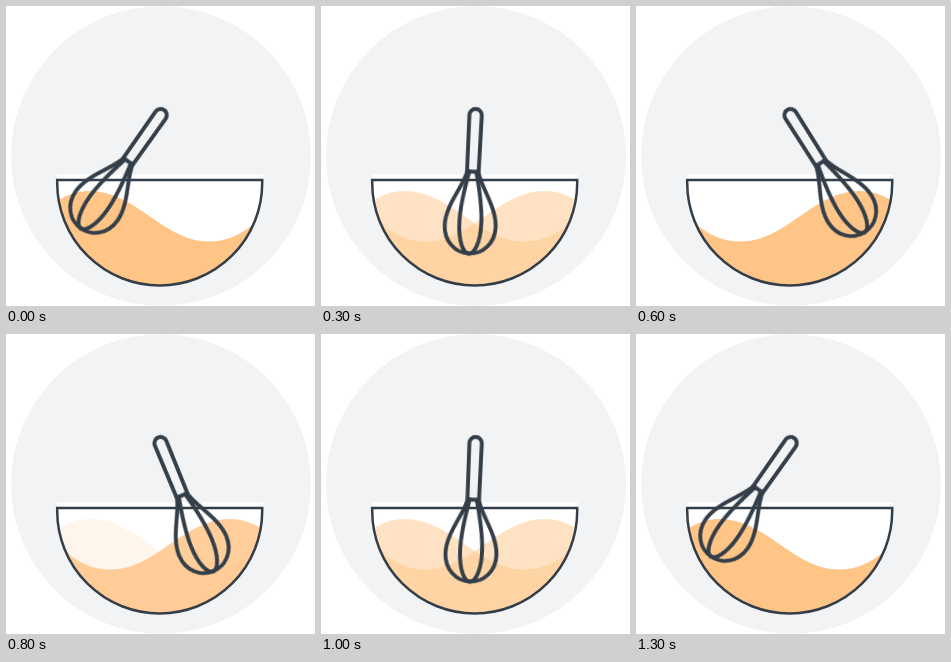
An HTML page that plays this animation: 309 by 300 pixels, repeating every 1400 ms.

```html
<!DOCTYPE html>
<html lang="en">
<head>
<meta charset="utf-8">
<title>Whisking bowl</title>
<style>
  html, body { margin: 0; width: 100%; height: 100%; overflow: hidden; background: #fff; }
  svg { display: block; width: 100vw; height: 100vh; }

  .batter { fill: #ffc587; animation: fade 1400ms steps(6) infinite; }
  .mirrored { animation-name: appear; }

  .line { fill: none; stroke: #333e48; stroke-linecap: round; stroke-linejoin: round; }
  .whisk { stroke-width: 3.9; animation: stir 1400ms step-end infinite; }

  /* Six discrete steps each way, with a rest at both ends */
  @keyframes fade {
    0%, 92.85%, 100% { opacity: 1; }
    42.85%, 49.99% { opacity: 0; }
  }
  @keyframes appear {
    0%, 92.85%, 100% { opacity: 0; }
    42.85%, 49.99% { opacity: 1; }
  }
  @keyframes stir {
    0%     { transform: rotate(35.2deg); }
    7.14%  { transform: rotate(30deg); }
    14.28% { transform: rotate(19deg); }
    21.42% { transform: rotate(2.8deg); }
    28.57% { transform: rotate(-13.3deg); }
    35.71% { transform: rotate(-26.5deg); }
    42.85% { transform: rotate(-32.3deg); }
    57.14% { transform: rotate(-22.3deg); }
    64.28% { transform: rotate(-10.5deg); }
    71.42% { transform: rotate(2.4deg); }
    78.57% { transform: rotate(15.5deg); }
    85.71% { transform: rotate(27deg); }
    92.85%, 100% { transform: rotate(35.2deg); }
  }
</style>
</head>
<body>
<svg viewBox="0 0 309 300">
  <defs>
    <path id="bowl" d="M51.2 174H256.2V177A102.5 102.5 0 0 1 51.2 177Z"/>
    <path id="wave" d="M50 196C60 189 71 185 83 185C131 185 157 235.5 203 235.5C222 235.5 236 228 250 216L260 206V285H50Z"/>
    <clipPath id="inside"><use href="#bowl"/></clipPath>
  </defs>

  <circle cx="155" cy="150" r="150" fill="#f1f3f4"/>
  <rect x="51" y="168.5" width="206" height="6" fill="#fff"/>
  <use href="#bowl" fill="#fff"/>

  <g clip-path="url(#inside)">
    <use class="batter" href="#wave"/>
    <g transform="matrix(-1 0 0 1 307.4 0)">
      <use class="batter mirrored" href="#wave"/>
    </g>
  </g>

  <use class="line" href="#bowl" stroke-width="2.5" style="stroke-linejoin: miter"/>

  <g transform="translate(154.6 109.2)">
    <g class="line whisk">
      <path d="M-5.8 56.5L-6.2 0A6.2 6.2 0 0 1 6.2 0L5.8 56.5Z"/>
      <path d="M-5.5 56.5C-9 72 -25.5 91 -25.5 111C-25.5 127 -14 138.5 0 138.5C14 138.5 25.5 127 25.5 111C25.5 91 9 72 5.5 56.5"/>
      <path d="M-3.5 56.5C-8 76 -11 92 -11 108C-11 126 -6 138.5 0 138.5C6 138.5 11 126 11 108C11 92 8 76 3.5 56.5"/>
    </g>
  </g>
</svg>
</body>
</html>
```
